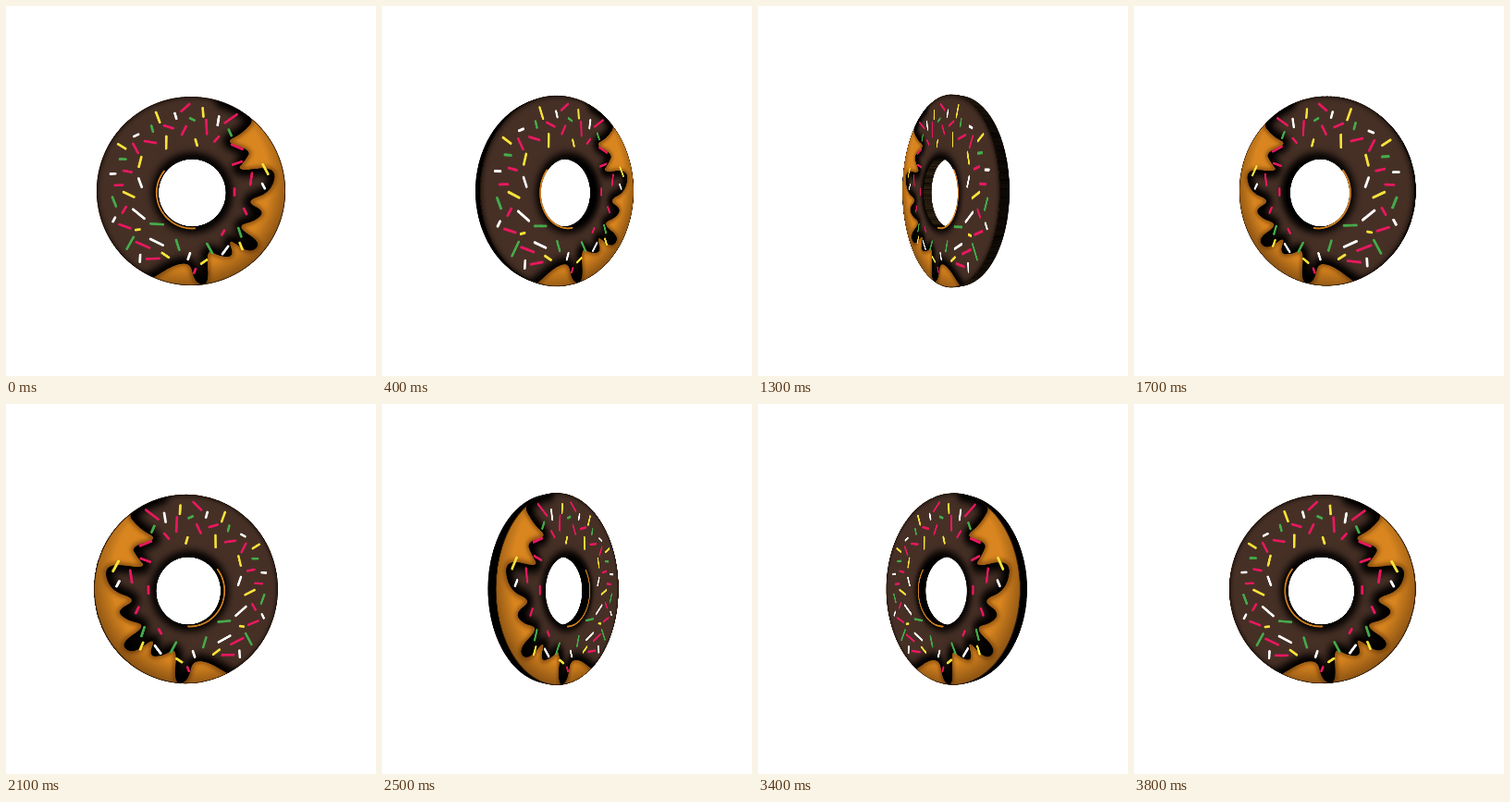
An HTML page with a canvas that plays this animation: 400 px wide and 400 px high, repeating every 3.9 s.

```html
<!DOCTYPE html>
<html>
<head>
<meta charset="utf-8">
<style>
html, body { margin: 0; width: 100%; height: 100%; overflow: hidden; background: #fff; }
canvas { display: block; }
</style>
</head>
<body>
<canvas id="stage" width="400" height="400"></canvas>
<script>
const LOOP = 3900, STEP = 100;
const VIEW = 380;              // camera distance
const FRONT = 4, BACK = -6.5;  // planes of the ring around its pivot
const HALF = 110;              // half size of a texture in stage pixels
const RES = 2;                 // texture pixels per stage pixel
const TAU = Math.PI * 2;

const ctx = document.getElementById('stage').getContext('2d');
const clamp = (v, lo, hi) => Math.max(lo, Math.min(hi, v));
const noise = n => Math.abs(Math.sin(n * 127.1) * 43758.5) % 1;

function circle(x, y, r) {
  const path = new Path2D();
  path.arc(x, y, r, 0, TAU);
  return path;
}

const rim = circle(200, 200, 102), hole = circle(201.3, 202, 37.5);
const icing = icingPath();

// Each drip runs from a valley in the icing edge to a blunt tip of a given width
function icingPath() {
  const drips = [
    { valley: [234, 103], tip: [264, 128], width: 26 },
    { valley: [236, 147], tip: [262, 161], width: 12 },
    { valley: [248, 179], tip: [290, 187], width: 29 },
    { valley: [258, 211], tip: [275, 227], width: 14 },
    { valley: [248, 238], tip: [270, 262], width: 18 },
    { valley: [239, 250], tip: [239, 271], width: 16 },
    { valley: [216, 262], tip: [212, 301], width: 16 }
  ];
  const edge = drips.flatMap(({ valley: [vx, vy], tip: [tx, ty], width }) => {
    const k = width / 2 / Math.hypot(tx - vx, ty - vy);
    const px = (ty - vy) * k, py = (vx - tx) * k;
    return [[vx, vy], [tx + px, ty + py], [tx - px, ty - py]];
  });
  edge.push([198, 272], [152, 296]);

  const path = new Path2D('M60 340V60H228');
  path.lineTo(...edge[0]);
  for (let i = 1; i < edge.length - 1; i++) {
    const [x, y] = edge[i], [nx, ny] = edge[i + 1];
    path.quadraticCurveTo(x, y, (x + nx) / 2, (y + ny) / 2);
  }
  path.lineTo(150, 299);
  path.closePath();
  return path;
}

// Textures are drawn in stage coordinates as seen when the face is square to the camera
function makeTexture(paint) {
  const canvas = document.createElement('canvas');
  canvas.width = canvas.height = HALF * 2 * RES;
  const g = canvas.getContext('2d');
  const k = RES * (VIEW - FRONT) / VIEW;
  g.translate(HALF * RES, HALF * RES);
  g.scale(k, k);
  g.translate(-200, -200);
  g.lineCap = g.lineJoin = 'round';
  g.save();
  g.clip(rim);
  paint(g);
  g.restore();
  g.globalCompositeOperation = 'destination-out';
  g.fill(hole);
  return canvas;
}

function softStroke(g, path, width, blur, color) {
  g.filter = `blur(${blur * RES}px)`;
  g.lineWidth = width;
  g.strokeStyle = color;
  g.stroke(path);
  g.filter = 'none';
}

// Sprinkles spiral outwards by the golden angle and stay on the icing
function drawSprinkles(g, count) {
  const colors = ['#e8185f', '#45aa4b', '#f8e23a', '#e8185f', '#ffffff'];
  g.lineWidth = 2.7;
  for (let i = 0; i < count; i++) {
    const r = 46 + 46 * Math.sqrt(i / count), a = i * 2.39996;
    const x = 201 + r * Math.cos(a), y = 201 + r * Math.sin(a);
    if (!ctx.isPointInPath(icing, x, y)) continue;
    const half = 2 + 6 * noise(i + 1), tilt = noise(i + 200) * Math.PI;
    const dx = half * Math.cos(tilt), dy = half * Math.sin(tilt);
    g.strokeStyle = colors[i % colors.length];
    g.beginPath();
    g.moveTo(x - dx, y - dy);
    g.lineTo(x + dx, y + dy);
    g.stroke();
  }
}

const face = makeTexture(g => {
  const dough = g.createRadialGradient(190, 188, 94, 190, 188, 122);
  dough.addColorStop(0, '#d98620');
  dough.addColorStop(1, '#7a4810');
  g.fillStyle = dough;
  g.fillRect(90, 90, 220, 220);
  softStroke(g, icing, 5, 2, 'rgba(60,25,0,.5)');

  g.save();
  g.clip(icing);
  g.fillStyle = '#463026';
  g.fillRect(90, 90, 220, 220);
  softStroke(g, icing, 15, 4, '#000');
  softStroke(g, hole, 12, 4, '#000');
  softStroke(g, rim, 3, 2, 'rgba(0,0,0,.7)');
  g.restore();

  g.lineWidth = 1.4;
  g.strokeStyle = 'rgba(20,10,0,.8)';
  g.stroke(rim);

  g.lineWidth = 2;
  g.strokeStyle = '#d08020';
  g.beginPath();
  g.arc(201.3, 202, 38.4, 1.5, 3.8);
  g.stroke();

  drawSprinkles(g, 72);
});

// Stacked slices of this striped ring form the walls
const slice = makeTexture(g => {
  const tone = g.createLinearGradient(98, 0, 302, 0);
  tone.addColorStop(0, '#21170f');
  tone.addColorStop(.3, '#5c4325');
  tone.addColorStop(1, '#6b4f29');
  g.fillStyle = tone;
  g.fillRect(90, 90, 220, 220);
  for (let y = 96; y < 304; y++) {
    g.fillStyle = `rgba(0,0,0,${noise(y) ** 2 * .8})`;
    g.fillRect(90, y, 220, 1);
  }
});

// A turn about the vertical axis maps every texture column to one stage column
function drawPlane(texture, z, sin, cos) {
  const localX = sx => (sx * (VIEW - z * cos) / VIEW - z * sin) / (cos - sx * sin / VIEW);
  for (let sx = -HALF; sx < HALF; sx++) {
    const a = localX(sx), b = localX(sx + 1);
    if (Math.min(Math.abs(a), Math.abs(b)) > HALF) continue;
    const lo = clamp(Math.min(a, b), -HALF, HALF), hi = clamp(Math.max(a, b), -HALF, HALF);
    if (hi - lo < .01) continue;
    const scale = VIEW / (VIEW + (lo + hi) / 2 * sin - z * cos);
    ctx.drawImage(texture, (lo + HALF) * RES, 0, (hi - lo) * RES, texture.height,
      200 + sx, 200 - HALF * scale, 1, HALF * 2 * scale);
  }
}

function draw(time) {
  const angle = Math.floor(time % LOOP / STEP) * STEP / LOOP * TAU;
  const sin = Math.sin(angle), cos = Math.cos(angle);
  const side = cos > 0 ? 1 : -1;
  ctx.clearRect(0, 0, 400, 400);
  for (let z = BACK; z < FRONT; z += .5) drawPlane(slice, z * side, sin, cos);

  // Walls turn black as they face away from the camera
  ctx.globalCompositeOperation = 'source-atop';
  ctx.fillStyle = `rgba(0,0,0,${1 - clamp((Math.abs(sin) - .78) / .2, 0, 1)})`;
  ctx.fillRect(0, 0, 400, 400);
  ctx.globalCompositeOperation = 'source-over';

  drawPlane(face, FRONT * side, sin, cos);
}

const start = performance.now();
function tick() {
  draw(performance.now() - start);
  requestAnimationFrame(tick);
}
tick();
</script>
</body>
</html>
```
